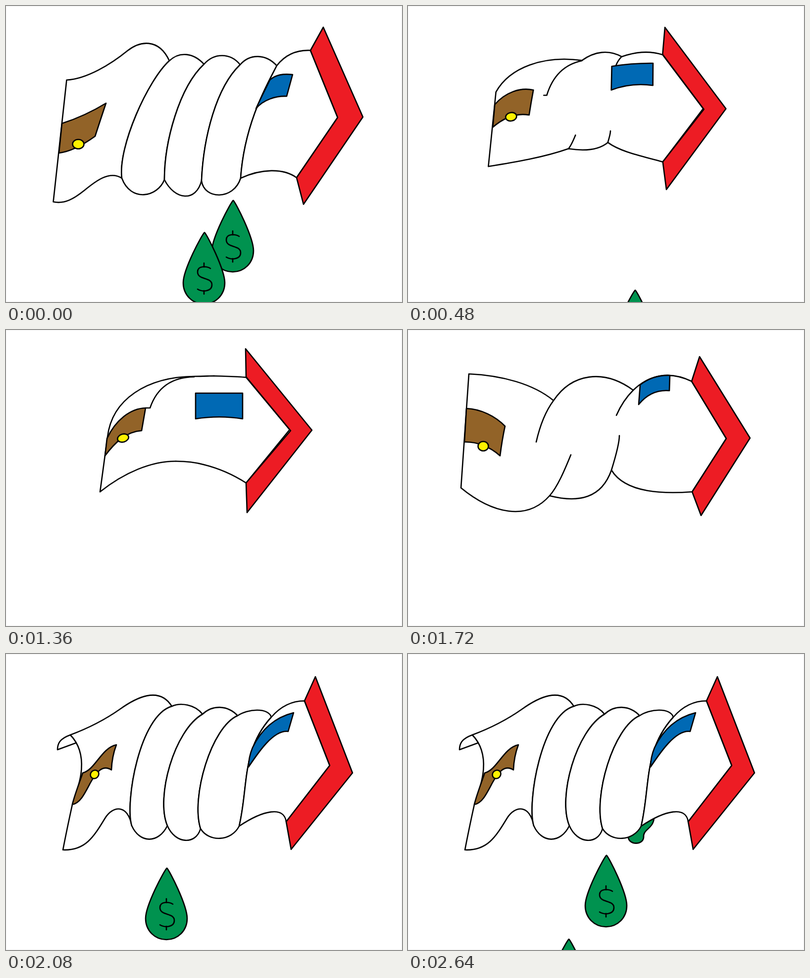
Recreate the animation shown at these times as an HTML page with a canvas. Size 800 by 600 pixels, loop 2.76 s.

```html
<!DOCTYPE html>
<html lang="en">
<head>
<meta charset="utf-8">
<title>Wrung house</title>
<style>
  html, body { margin: 0; width: 100%; height: 100%; overflow: hidden; background: #fff; }
  canvas { display: block; }
</style>
</head>
<body>
<canvas id="stage" width="800" height="600"></canvas>
<script>
const ctx = document.getElementById('stage').getContext('2d');
const RED = '#ed1c24', BLUE = '#0069b4', BROWN = '#926328', YELLOW = '#fff200', GREEN = '#00924f';

// Each pose: roof, window, door, knob (x y rx ry angle), then the white parts from back to front.
const house = [
  'M482 40L615 210L483 384L482 335L571 212L482 88Z',
  'M383 132H478V184H383Z',
  'M216 182H329V243H216Z',
  '273 240 12.5 11.5 0',
  'M216 88H482L571 212L482 335H216Z'
];
const bent = [
  'M484 38L618 203L487 370L485 310L575 204L485 95Z',
  'M383 128C415 128 447 128 478 128L478 180C447 175 415 175 383 180Z',
  'M204 220C221 183 251 159 282 158Q278 181 274 204C243 206 220 228 200 255Z',
  '236.5 219 11.5 8 -.3',
  'M205 217C214 140 285 95 380 94C400 94 410 93 420 93C445 94 465 94 485 96L573 202L485 310C457 292 428 280 400 273C382 268 362 266 343 266C293 266 239 289 190 328Z',
  'M282 158L291 158Q312 96 380 95M343 266C343 266 343 266 343 266M420 93Q420 93 420 93M400 273Q400 273 400 273'
];
const halfTurn = [
  'M589 54L691 219L592 376L574 328L643 220L573 104Z',
  'M469 111C486 98 507 91 529 92L528 123C505 121 483 130 466 151Z',
  'M118 159C147 160 177 175 196 195Q190 223 186 255C165 236 138 226 114 227Z',
  '152 235.5 10.5 9.5 0',
  'M123 89C189 92 253 109 294 143C331 88 395 78 455 122C485 93 525 81 573 104L643 220L574 328C520 332 440 332 411 284C391 341 345 351 286 336C240 388 170 372 107 320Z',
  'M259 227L259 227Q271 174 294 143M329 253C316 285 302 318 286 336M455 122Q434 143 421 173M427 214Q427 232 411 284'
];
const fullTurn = [
  'M620 46L714 222L598 392L582 340L662 223L598 95Z',
  'M497 137C514 118 530 110 556 113L548 152C522 150 500 160 482 178Z',
  'M115 198C145 196 178 188 200 194Q192 225 183 260C160 263 132 265 108 263Z',
  '148 262 11.5 9.5 0',
  'M122 118C175 114 225 92 262 92C285 92 303 102 313 122C275 165 241 265 262 345C230 352 205 385 165 388C140 389 118 382 97 372Z',
  'M313 122C340 86 385 86 414 119C370 165 345 265 343 349C330 390 280 385 262 345C241 265 275 165 313 122Z',
  'M414 119C442 86 482 90 508 122C478 165 455 260 447 340C432 386 360 388 343 349C345 265 370 165 414 119Z',
  'M508 122C535 94 570 86 598 95L662 223L582 340C545 340 485 342 447 340C455 260 478 165 508 122Z'
];
const wrung = [
  'M641 43L721 225L601 402L587 348L670 226L615 90Z',
  'M533 150C545 139 560 137 579 139L567 183C545 182 520 190 505 208C513 190 525 167 533 150Z',
  'M113 238C144 228 176 213 202 197Q191 230 180 264C158 280 131 295 107 298Z',
  '146 280 11.5 9.5 0',
  'M122.5 150C163 148 212 118 245 91C270 71 308 64 330 111C287 150 226 285 234 349C209 333 181 355 158 374C138 390 119 402 95.5 397Z',
  'M330 111C350 92 378 94 400 118C350 165 320 275 320 352C306 388 252 398 234 349C226 285 287 150 330 111Z',
  'M400 118C420 95 453 94 473 119C425 165 399 265 395 354C384 398 341 394 320 352C320 275 350 165 400 118Z',
  'M473 119C493 96 525 97 547 121C530 155 482 235 474 349C460 394 400 393 395 354C399 265 425 165 473 119Z',
  'M547 121C567 95 592 89 615 90L670 226L587 348C560 328 515 330 474 349C482 235 530 155 547 121Z'
];
const curled = [
  'M625 46L700 241L576 396L566 340L654 226L603 95Z',
  'M498 190C517 150 545 128 581 119L570 157C541 153 510 199 490 229C490 214 493 202 498 190Z',
  'M155 241C180 235 193 190 223 184Q214 208 213 235C195 223 182 240 170 262C158 285 149 303 134 305C138 287 148 262 155 241Z',
  '179 244 9 8 -.8',
  'M130 164C108 172 104 182 104 194L142 180C139 174 135 169 130 164Z',
  'M130 164C170 149 203 131 230 112C262 89 309 64 335 106C270 125 240 300 254 348C246 304 216 307 200 333C177 371 160 399 115 397C122 360 129 328 134 305C142 280 174 210 130 164Z',
  'M335 106C352 98 382 102 397 122C340 155 302 290 326 348C308 385 270 384 254 348C240 300 270 125 335 106Z',
  'M397 122C417 103 447 103 468 125C415 148 373 290 393 354C384 387 342 386 326 348C302 290 340 155 397 122Z',
  'M468 125C488 111 530 108 536 128C475 195 490 270 471 349C455 380 410 382 393 354C373 290 415 148 468 125Z',
  'M536 128C555 106 577 95 603 95L654 226L566 340C562 308 520 316 471 349C490 270 475 195 536 128Z'
];
const tight = [
  'M604 46L667 240L560 396L553 340L628 226L584 95Z',
  'M500 183C514 147 536 118 566 119L556 156C531 155 504 209 492 251C492 228 494 203 500 183Z',
  'M161 249C177 229 202 210 228 194Q215 218 217 244C202 233 195 244 187 258C172 285 165 312 143 315C147 293 154 270 161 249Z',
  '186 254 8.5 8 -.8',
  'M141 176C115 182 101 205 111 235L168 217C172 190 164 173 141 176Z',
  'M141 176C178 166 214 143 240 124C267 105 309 80 337 125C262 150 245 270 251 318C233 294 214 306 201 328C180 362 155 385 124 397C130 367 137 338 143 315C160 245 190 176 141 176Z',
  'M337 125C356 118 383 124 396 139C345 185 304 280 327 333C305 368 255 370 251 318C245 270 262 150 337 125Z',
  'M396 139C413 123 445 122 468 141C415 175 372 280 393 338C380 365 340 364 327 333C304 280 345 185 396 139Z',
  'M468 141C485 132 502 132 517 133C488 185 505 290 466 339C440 362 407 358 393 338C372 280 415 175 468 141Z',
  'M517 133C533 107 557 94 584 95L628 226L553 339C544 301 498 305 466 339C505 290 488 185 517 133Z'
];

const NUM = /-?[\d.]+/g;
const mix = (a, b, t) => a.map((path, k) => {
  const to = b[k].match(NUM);
  let i = 0;
  return path.replace(NUM, v => (+v + (to[i++] - v) * t).toFixed(2));
});

const opening = mix(halfTurn, bent, 1 / 3);
const almostFlat = mix(halfTurn, bent, 2 / 3);
const squeezing = mix(curled, tight, .5);

// Step start times, poses and the green seeping out below them.
const times = [0, 120, 240, 360, 480, 600, 720, 1360, 1480, 1600, 1720, 1840, 1960, 2080, 2200, 2320, 2520, 2640];
const poses = [
  wrung, fullTurn, halfTurn, opening, almostFlat, bent, house, bent, almostFlat,
  opening, halfTurn, fullTurn, wrung, curled, squeezing, tight, squeezing, curled
];
const leaks = {
  12: 'M252 374C256 405 280 393 299 411C310 425 328 427 336 411C342 397 360 397 378 383L320 345Z',
  15: 'M355 358C378 378 420 378 438 354L393 330Z',
  17: 'M445 372C447 387 474 388 476 372C474 355 495 355 497 333L470 345Z'
};
const DROP = 'M0 0C5 4 41 75 41 102C41 127 22 145 -1 145C-24 145 -43 127 -43 102C-43 75 -5 4 0 0Z';
const DOLLAR = 'M12 73C4 68 -14 67 -14 80C-14 97 15 90 15 106C15 120 -4 121 -14 115M-1 62V70M-1 118V125';
const LOOP = 2760;

function shape(path, fill) {
  const p = new Path2D(path);
  if (fill) {
    ctx.fillStyle = fill;
    ctx.fill(p);
  }
  ctx.stroke(p);
}

function drop(x, y) {
  ctx.save();
  ctx.translate(x, y);
  shape(DROP, GREEN);
  shape(DOLLAR);
  ctx.restore();
}

function drops(i) {
  if (i >= 13) drop(325, 506 + 36 * (i - 15));
  if (i < 6) drop(459, 394 + 45.5 * i);
  if (i < 6) drop(401, 459 + 45.5 * i);
  if (i >= 16) drop(401, 459 + 51 * (i - 18));
}

function knob(spec) {
  const [x, y, rx, ry, angle] = spec.split(' ').map(Number);
  ctx.beginPath();
  ctx.ellipse(x, y, rx, ry, angle, 0, 2 * Math.PI);
  ctx.fillStyle = YELLOW;
  ctx.fill();
  ctx.stroke();
}

function draw() {
  const t = performance.now() % LOOP;
  const i = times.findLastIndex(start => start <= t);
  const [roof, pane, door, handle, ...walls] = poses[i];

  ctx.fillStyle = '#fff';
  ctx.fillRect(0, 0, 800, 600);
  ctx.lineWidth = 1;
  ctx.strokeStyle = '#f0f0f0';
  ctx.strokeRect(.5, .5, 799, 599);

  ctx.lineWidth = 2.6;
  ctx.lineJoin = ctx.lineCap = 'round';
  ctx.strokeStyle = '#000';
  drops(i);
  if (leaks[i]) shape(leaks[i], GREEN);
  walls.forEach(wall => shape(wall, '#fff'));
  shape(door, BROWN);
  shape(pane, BLUE);
  knob(handle);
  shape(roof, RED);
  requestAnimationFrame(draw);
}
draw();
</script>
</body>
</html>
```
